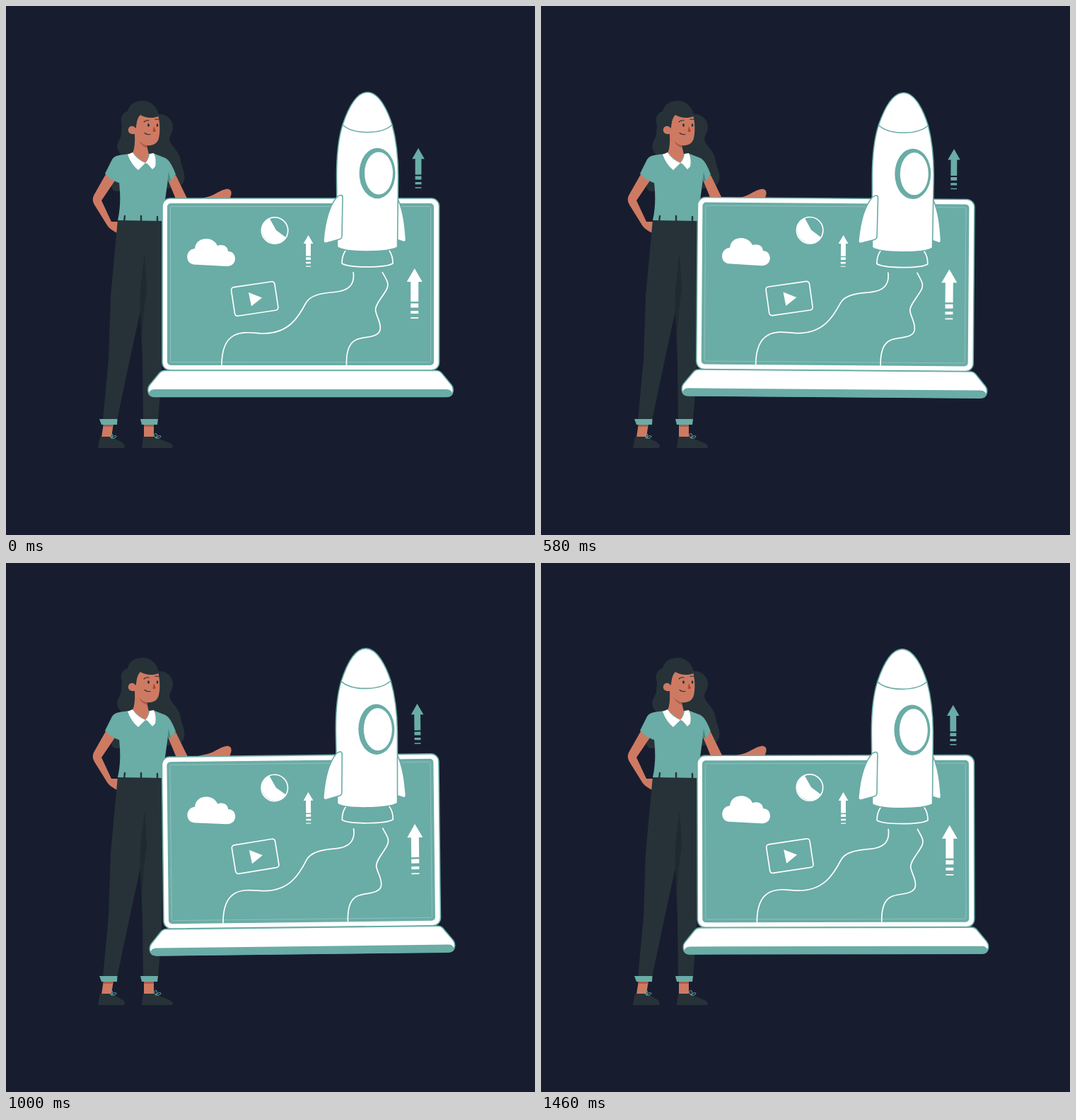
Recreate the animation shown at these times as an HTML page. Size 748 by 748 pixels, loop 1500 ms.

```html
<!DOCTYPE html>
<html lang="en">
<head>
<meta charset="utf-8">
<style>
  html, body { margin: 0; height: 100%; overflow: hidden; background: #171d2f; }
  svg { display: block; width: 100vw; height: 100vh; }
  .teal { fill: #6aaca6; }
  .dark { fill: #263238; }
  .skin { fill: #ce7a63; }
  .white { fill: #fff; }
  .shade { fill: #ac5d4a; }
  .edge { stroke: #6aaca6; stroke-width: 1.6; }
  .line { fill: none; stroke: #fff; stroke-width: 1.7; stroke-linecap: round; stroke-linejoin: round; }
  .ink { fill: none; stroke: #263238; stroke-width: 1.1; stroke-linecap: round; }
  .lace { fill: none; stroke: #6aaca6; stroke-width: 1; }
</style>
</head>
<body>
<svg viewBox="0 0 748 748">
  <defs>
    <path id="arrow" d="M0 0L11 19H5.5V47H-5.5V19H-11ZM-5.5 49.5H5.5V55.5H-5.5ZM-5.5 60H5.5V64H-5.5ZM-5.5 69.2H5.5V71H-5.5Z"/>
    <path id="lace" class="lace" d="M0 2C-4 -2 -2 -6 1 -4Q3 -2 0 2C2 -1 7 -3 7 0Q5 3 0 2"/>
  </defs>

  <g id="woman">
    <path class="dark" d="M164 168C160 158 166 150 172 149C174 139 183 134 193 134C205 134 213 142 216 153C226 152 236 160 236 171C236 179 231 183 231 189C233 198 246 206 247 219C248 228 254 236 252 246C250 254 244 257 236 257L200 262H156Q150 262 149 255L165 212C158 207 156 199 158 194C160 188 163 186 163 180Z"/>
    <path class="skin" d="M229 246L240 239L257 274L245 285ZM262 275L285 270C296 267 303 260 311 259C317 258 320 262 318 268L314 280H262Z"/>
    <path class="skin" d="M141 238L124 268Q121 275 125 281L143 310C147 316 155 320 160 322C164 321 166 317 167 312L160 305L149 305L135 275L154 247Z"/>
    <path class="skin" d="M138 590H152L149 610H135ZM195 590H209V610H195Z"/>
    <path class="shade" d="M138 592H151L150.500 595H137.500ZM195 592H209V595H195Z"/>
    <path class="dark" d="M158 302H222V400L220 520L215 586H194L193 500L190 431L175 500L157 586H137L145 500L148 410Z"/>
    <path fill="#1f2a30" d="M196 350L199 400L195 430L192 470L189.500 428L190 400Z"/>
    <path class="teal" d="M132 584H157.500L157 592H135ZM190 584H215L214 592H192Z"/>
    <path class="dark" d="M133 609H150C155 614 168 616 168 623L167 625H130ZM194 609H211C217 614 236 617 236 623L235 625H192Z"/>
    <use href="#lace" x="149" y="609"/>
    <use href="#lace" x="212" y="609"/>

    <path class="teal" d="M174 209C160 211 154 211 150 217L140 237C146 244 153 248 160 250C162 268 162 285 158 303L221 304L229 245L233 248L240 238C236 228 231 216 223 214L210 209Z"/>
    <path fill="#4c8984" d="M230 234L233 248L228.500 246Z"/>
    <path class="ink" style="stroke-width:2.4" d="M168 297L167 305M191 297V305M214 298V305"/>

    <path class="skin" d="M187 154H215C218 166 218 179 216 187C214 195 207 198 199 197L202 210L197 223L179 208Q183 200 182 181C175 182 172 178 173 174C174 169 181 168 183 173Z"/>
    <path class="shade" d="M188 190Q193 196 199 197L200 201Q191 198 188 190Z"/>
    <path class="dark" d="M184 173C184 164 186 158 190 154C198 159 208 159 216 156L213 146L190 142L178 152L177 169Q182 168 184 173Z"/>
    <path class="white" d="M172 210L179 207Q185 217 197 222L187 232Q177 224 172 210ZM197 222Q202 217 203 209L209 208Q213 217 211 227L207 231L200 223Z"/>
    <ellipse class="dark" cx="201.500" cy="168.500" rx="1.400" ry="2.300"/>
    <ellipse class="dark" cx="214" cy="168.500" rx="1.300" ry="2.300"/>
    <path class="ink" d="M195 164Q198 161 202 162M211 160.500Q213 159.500 216 160.500M196 179.500Q199 182.500 204 181.500"/>
    <path fill="#b5452f" d="M209 170L212 177Q210 179 207.500 177.500Z"/>
  </g>

  <g id="laptop">
    <rect class="white edge" x="221" y="272" width="391.500" height="243" rx="11"/>
    <rect class="teal" x="228" y="279" width="377" height="229" rx="5"/>
    <rect x="232.500" y="283.500" width="368" height="220" rx="2" fill="none" stroke="#9ccac5" stroke-width=".7"/>
    <path class="white edge" d="M224 515.500H609Q613 515.500 616 519L630 536Q633 540 632 545Q631 552.500 623 552.500H210Q202 552.500 201 545Q200 540 203 536L217 519Q220 515.500 224 515.500Z"/>
    <path class="teal" d="M202 548Q203 542 210 542H623Q630 542 631 548Q629 553 623 553H210Q204 553 202 548Z"/>

    <path class="white" d="M265 365.500C252 363 254 344 267 343C268 332 277 329 283 329C291 329 297 334 299 339C308 336 314 341 314 347C322 347 324 353 324 358C323 366 317 368 312 368Z"/>
    <circle class="line" cx="380" cy="317.500" r="18.700"/>
    <path class="white" d="M372.500 300L382 317L396 327.500A18.700 18.700 0 1 1 372.500 300Z"/>
    <rect class="line" x="-31" y="-20.500" width="62" height="41" rx="4" transform="translate(351.700 414) rotate(-8.500)"/>
    <path class="white" d="M343 405L362 412.500L347 424.500Z"/>
    <use href="#arrow" class="white" transform="translate(427.500 324) scale(.63)"/>
    <use href="#arrow" class="white" transform="translate(577.700 371)"/>
    <use href="#arrow" class="teal" transform="translate(583 201) scale(.8)"/>

    <path class="line" style="stroke-linecap:butt" d="M491 376C494 396 482 403 465 404.500C445 406 430 409 424 420C414 439 400 464 362 463C345 463 305 450 305 508M532 376C537 386 543 392 538 401C532 412 522 422 522.500 430C524 440 531 448 529 458C526 470 505 467 495 472C484 477 481 492 481.500 508"/>
    <path class="line" d="M480 346Q475 353 475 364C485 370.500 537 370.500 547 364Q547 353 542 346"/>
    <path class="white edge" d="M554 273C562 290 564 310 565.500 330Q565 335 561 333L552 330Z"/>
    <path class="white edge" d="M511 122C494 122 482 150 476 168C469 190 467.500 215 467.500 240L468.500 341C480 349 540 349 553.500 341L554.500 240C554.500 215 552 190 546 168C540 149 528 122 511 122Z"/>
    <path class="edge" fill="none" d="M476 168C491 182 531 182 546 168"/>
    <ellipse class="teal" cx="525" cy="236.500" rx="25.500" ry="35.700"/>
    <ellipse class="white" cx="527" cy="236.500" rx="20" ry="30"/>
    <path class="white edge" d="M468 270C473 266 476.500 267 476 272L475 325Q475 329 471 330L453 335Q448 336 449 330C451 308 456 284 468 270Z"/>
  </g>
</svg>
<script>
  const PERIOD = 1500;
  const laptop = document.getElementById('laptop');

  // Linear sway between +1 and -1 degrees, starting upright.
  function sway(phase) {
    if (phase < 0.25) return phase * 4;
    return phase < 0.75 ? 2 - phase * 4 : phase * 4 - 4;
  }

  function draw(now) {
    const angle = sway((now % PERIOD) / PERIOD);
    laptop.setAttribute('transform', `rotate(${angle} 416.8 337)`);
    requestAnimationFrame(draw);
  }
  draw(performance.now());
</script>
</body>
</html>
```
